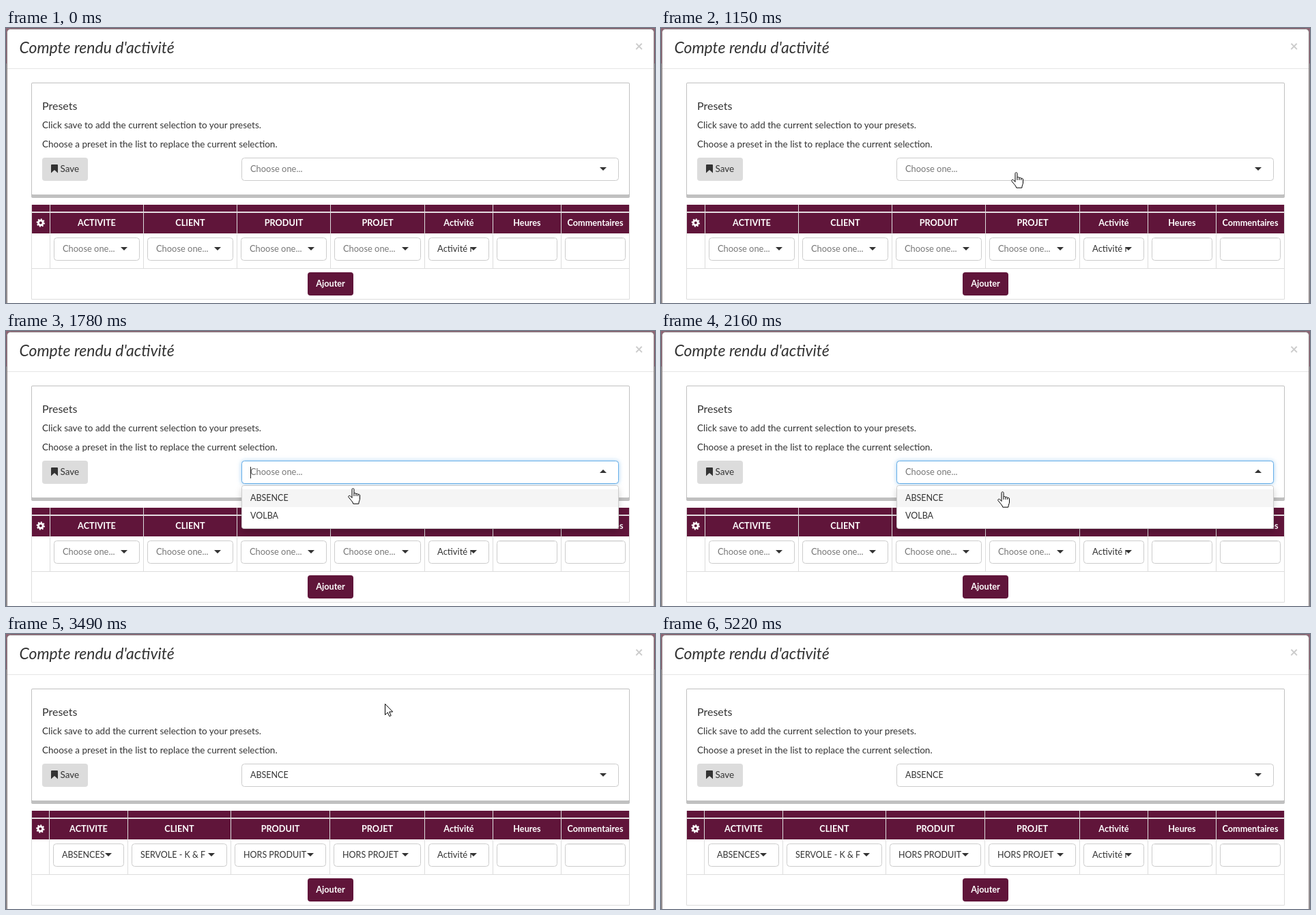
Recreate the animation shown at these times as an HTML page. Size 951 by 403 pixels, loop 6300 ms.

```html
<!DOCTYPE html>
<html lang="fr">
<head>
<meta charset="utf-8">
<title>Compte rendu d'activité</title>
<style>
html, body { margin: 0; width: 100%; height: 100%; overflow: hidden; background: #fff; }
svg { display: block; font: 13.5px Lato, "Open Sans", sans-serif; fill: #333; }
.title { font-size: 23px; font-style: italic; }
.close { font-size: 21px; font-weight: 700; fill: #ccc; }
.h4 { font-size: 16px; }
.hint { font-size: 12.9px; fill: #777; }
.caps { font-size: 12.5px; }
.act { font-size: 13px; }
.th { font-size: 12.7px; font-weight: 700; fill: #fff; text-anchor: middle; }
.box { fill: #fff; stroke: #ccc; }
.line { fill: none; stroke: #ddd; }
.wine { fill: #60153a; }
.focus { stroke: #66afe9; filter: drop-shadow(0 0 3px rgba(102, 175, 233, .6)); }
.menu { fill: #fff; stroke: #ccc; filter: drop-shadow(0 5px 5px rgba(0, 0, 0, .175)); }
.pointer { fill: #fff; stroke: #000; stroke-linejoin: round; }

.before, .open, .after, .caret, #cursor, .arrow, .hand, .beam {
  animation: 6300ms step-end infinite;
}
.before { animation-name: before; }
.open { animation-name: open; }
.after { animation-name: after; }
.caret { animation-name: caret; }
#cursor { animation-name: travel; }
.arrow { animation-name: arrow; }
.hand { animation-name: hand; }
.beam { animation-name: beam; }

@keyframes before { 0% { visibility: visible } 44.6%, 100% { visibility: hidden } }
@keyframes after { 0% { visibility: hidden } 44.6%, 100% { visibility: visible } }
@keyframes open { 0%, 44.6%, 100% { visibility: hidden } 21.11% { visibility: visible } }
@keyframes caret { 0%, 29.52%, 100% { visibility: hidden } 21.11% { visibility: visible } }
@keyframes arrow {
  0%, 17.04%, 75.07%, 82.85%, 100% { visibility: hidden }
  4.76%, 55.39%, 81.42% { visibility: visible }
}
@keyframes hand { 0%, 55.39%, 100% { visibility: hidden } 17.04% { visibility: visible } }
@keyframes beam { 0%, 81.42%, 100% { visibility: hidden } 75.07% { visibility: visible } }
@keyframes travel {
  0% { transform: translate(753px, 379px) }
  5.95% { transform: translate(630px, 295px) }
  7.14% { transform: translate(549px, 244px) }
  12.22% { transform: translate(547px, 242px) }
  13.42% { transform: translate(542px, 237px) }
  14.63% { transform: translate(535px, 231px) }
  15.84% { transform: translate(528px, 225px) }
  17.04% { transform: translate(522px, 216px) }
  18.25% { transform: translate(519px, 211px) }
  26.98% { transform: translate(514px, 219px) }
  28.25% { transform: translate(507px, 230px) }
  29.52% { transform: translate(502px, 235px) }
  31.9% { transform: translate(502px, 236px) }
  33.09% { transform: translate(500px, 236px) }
  34.28% { transform: translate(499px, 235px) }
  46.82% { transform: translate(536px, 150px) }
  48.09% { transform: translate(555px, 102px) }
  71.42% { transform: translate(558px, 105px) }
  72.69% { transform: translate(625px, 163px) }
  73.8% { transform: translate(720px, 247px) }
  75.07% { transform: translate(779px, 298px) }
  80.15% { transform: translate(788px, 318px) }
  81.42%, 100% { transform: translate(807px, 365px) }
}
</style>
</head>
<body>
<svg id="stage" width="951" height="403" viewBox="0 0 951 403"></svg>
<script>
const rect = (x, y, w, h, cls, r = 0, more = '') =>
  `<rect x="${x}" y="${y}" width="${w}" height="${h}" rx="${r}" class="${cls}" ${more}/>`;
const text = (x, y, s, cls = '') =>
  `<text x="${x}" y="${y}" class="${cls}">${s.replace(/&/g, '&amp;')}</text>`;
const path = (d, cls = '', more = '') => `<path d="${d}" class="${cls}" ${more}/>`;
const group = (cls, ...parts) => `<g class="${cls}">${parts.join('')}</g>`;

const box = (left, right, top, cls = '') =>
  rect(left + .5, top + .5, right - left - 1, 33, 'box ' + cls, 4);
const down = (x, y) => path(`M${x - 5} ${y}h10l-5 5z`);
const up = (x, y) => path(`M${x - 5} ${y + 5}h10l-5 -5z`);
const select = (left, right, label, cls) =>
  box(left, right, 307) + text(left + 13, 328, label, cls) + down(right - 23, 321);
const input = (left, right) =>
  box(left, right, 307) + path(`M${left + 2} 308.5H${right - 2}`, '', 'stroke="#eee"');

const gear = x => `<g fill="none" stroke="#fff" transform="translate(${x} 285.5)">
  <circle r="3.4" stroke-width="2.8"/>
  <circle r="5" stroke-width="2.4" pathLength="16" stroke-dasharray="1 1"/></g>`;

// Columns whose widths depend on the chosen values
function columns(cls, edges, labels, style) {
  const names = ['ACTIVITE', 'CLIENT', 'PRODUIT', 'PROJET'];
  const cells = names.map((name, i) => {
    const l = edges[i], r = edges[i + 1];
    return path(`M${l + .5} 259V352`, 'line') +
      text((l + r + 1) / 2, 290, name, 'th') +
      select(l + 6, r - 5, labels[i], style);
  });
  return group(cls, gear((37 + edges[0]) / 2 + .3), ...cells);
}

const modal =
  rect(0, 0, 951, 403, '', 0, 'fill="#999"') +
  rect(0, 0, 951, 52, '', 0, 'fill="#8f6675"') +
  rect(1.5, 1.5, 948, 420, '', 5, 'fill="#fff" stroke="#8a7f83"') +
  path('M2 59.5H949', '', 'stroke="#e5e5e5"') +
  text(19.5, 37, "Compte rendu d'activité", 'title') +
  text(921.5, 34, '×', 'close');

const presets =
  rect(37, 80, 877, 169, '', 2, 'fill="#c0c0c0"') +
  rect(38, 81, 875, 163, '', 1, 'fill="#fff"') +
  text(53, 120, 'Presets', 'h4') +
  text(53, 147, 'Click save to add the current selection to your presets.') +
  text(53, 175, 'Choose a preset in the list to replace the current selection.') +
  rect(53, 190, 67, 34, '', 4, 'fill="#dcdcdc"') +
  path('M66 201q0-1 1-1h8q1 0 1 1v11.5l-5-4.5l-5 4.5z') +
  text(79.5, 211, 'Save') +
  box(345, 898, 190) +
  group('before', text(358, 211, 'Choose one...', 'hint')) +
  group('after', text(358, 211, 'ABSENCE', 'caps')) +
  down(875, 204);

const table =
  rect(38, 259, 876, 42, 'wine') +
  path('M37.5 259V397.5H913.5V259M38 352.5H913M613.5 259V352M713.5 259V352M813.5 259V352', 'line') +
  path('M38 270H913', '', 'stroke="#e4dce0" stroke-width="2"') +
  columns('before', [64, 201, 338, 475, 613], Array(4).fill('Choose one...'), 'hint') +
  columns('after', [63, 178, 329, 474, 613],
    ['ABSENCES', 'SERVOLE - K & F', 'HORS PRODUIT', 'HORS PROJET'], 'caps') +
  text(663.5, 290, 'Activité', 'th') +
  text(763.5, 290, 'Heures', 'th') +
  text(863.5, 290, 'Commentaires', 'th') +
  select(619, 708, 'Activité r', 'act') +
  input(719, 808) + input(819, 908) +
  rect(442, 358, 67, 34, 'wine', 4) +
  text(475.5, 379, 'Ajouter', 'th');

const dropdown = group('open',
  box(345, 898, 190, 'focus'),
  text(358, 211, 'Choose one...', 'hint'),
  up(875, 203),
  rect(345.5, 226.5, 552, 63, 'menu', 3),
  rect(346, 232, 551, 26, '', 0, 'fill="#f5f5f5"'),
  text(358, 249, 'ABSENCE', 'caps'),
  text(358, 275, 'VOLBA', 'caps')
) + path('M358.5 199V216', 'caret', 'stroke="#222"');

const cursor = `<g id="cursor">` +
  path('M.5.5V16.5L4.2 13L6.8 18.6L9.2 17.5L6.7 12H11.7Z', 'pointer arrow') +
  group('hand', path('M6 14.5V2.3C6 .2 9 .2 9 2.3V8.4C9.3 7 12 7.2 12 9C12.5 7.8 14.6 8 14.8 9.8' +
    'C15.5 8.8 17.5 9.2 17.5 11V16C17.5 18 16 19.5 15.8 23.2H7.8C7.5 20.5 3.5 17 1 13.5' +
    'C0 11.8 2.2 10.6 3.4 11.7ZM9 8.4V12M12 9V12M14.8 9.8V12', 'pointer', 'transform="translate(-6 0)"')) +
  path('M-3 -7.5H0M1 -7.5H4M.5 -7V7M-3 7.5H0M1 7.5H4', 'beam', 'stroke="#000"') +
  '</g>';

document.getElementById('stage').innerHTML = modal + presets + table + dropdown + cursor;
</script>
</body>
</html>
```
